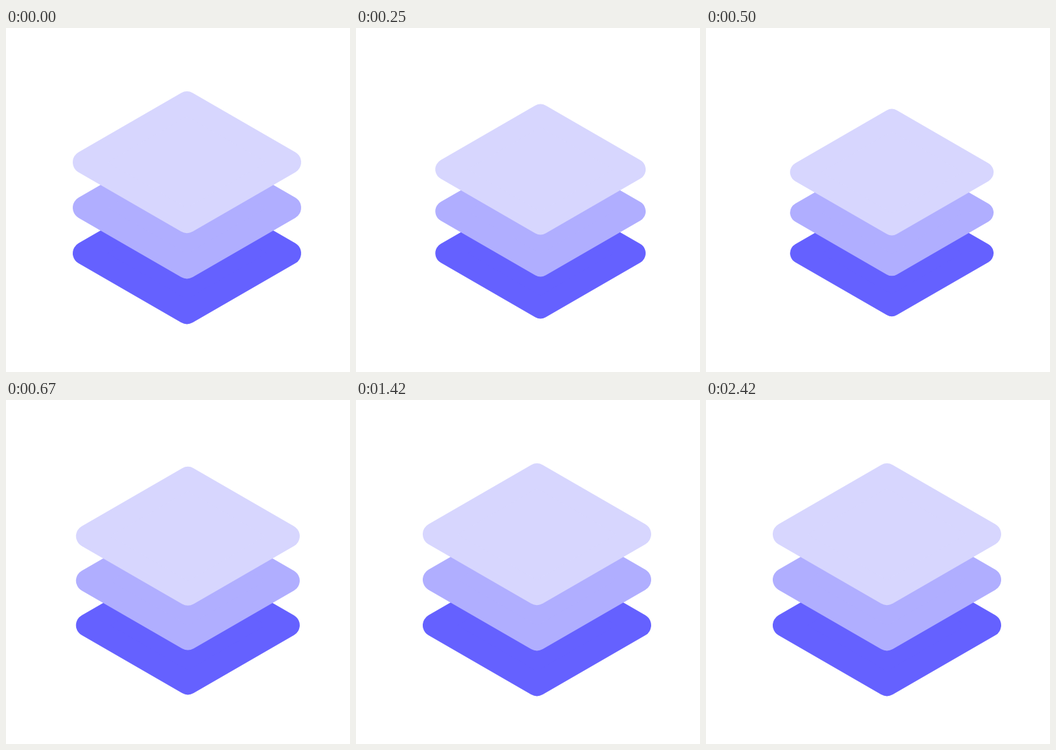
An HTML page that plays this animation: 500x500 px, repeating every 2580 ms.

```html
<!DOCTYPE html>
<html lang="en">
<head>
<meta charset="utf-8">
<title>Layers</title>
<style>
  html, body { margin: 0; width: 100%; height: 100%; overflow: hidden; background: #fff; }
  svg { display: block; width: 100%; height: 100%; }
  polygon { stroke-width: 34; stroke-linejoin: round; }
</style>
</head>
<body>
<svg viewBox="0 0 500 500">
  <g id="stack"></g>
</svg>
<script>
const LOOP = 2580;
const FPS = 12;
const PIVOT = { x: 328, y: 327.3 };
const PRESS = { start: 50, end: 758, depth: 0.1316 };
const LAYERS = [
  { y: 327.4, color: '#6561ff' },
  { y: 261.2, color: '#b0aeff' },
  { y: 195.1, color: '#d7d6fe' }
];

const stack = document.getElementById('stack');

// The round-joined stroke gives each rhombus its soft corners.
function addLayer({ y, color }) {
  const x = 263, w = 149, h = 86;
  const shape = document.createElementNS('http://www.w3.org/2000/svg', 'polygon');
  shape.setAttribute('points', `${x - w},${y} ${x},${y - h} ${x + w},${y} ${x},${y + h}`);
  shape.setAttribute('fill', color);
  shape.setAttribute('stroke', color);
  stack.appendChild(shape);
}

// Eased dip from 1 down and back to 1.
function scaleAt(ms) {
  const p = (ms - PRESS.start) / (PRESS.end - PRESS.start);
  if (p <= 0 || p >= 1) return 1;
  return 1 - PRESS.depth * (1 - Math.cos(2 * Math.PI * p)) / 2;
}

function draw(ms) {
  // Hold each pose for one tick; ticks start up to 4 ms early.
  const tick = Math.floor((ms % LOOP + 4) * FPS / 1000);
  const s = scaleAt(tick * 1000 / FPS);
  const { x, y } = PIVOT;
  stack.setAttribute('transform', `translate(${x} ${y}) scale(${s}) translate(${-x} ${-y})`);
}

LAYERS.forEach(addLayer);
draw(0);

const t0 = performance.now();
function frame() {
  draw(performance.now() - t0);
  requestAnimationFrame(frame);
}
requestAnimationFrame(frame);
</script>
</body>
</html>
```
